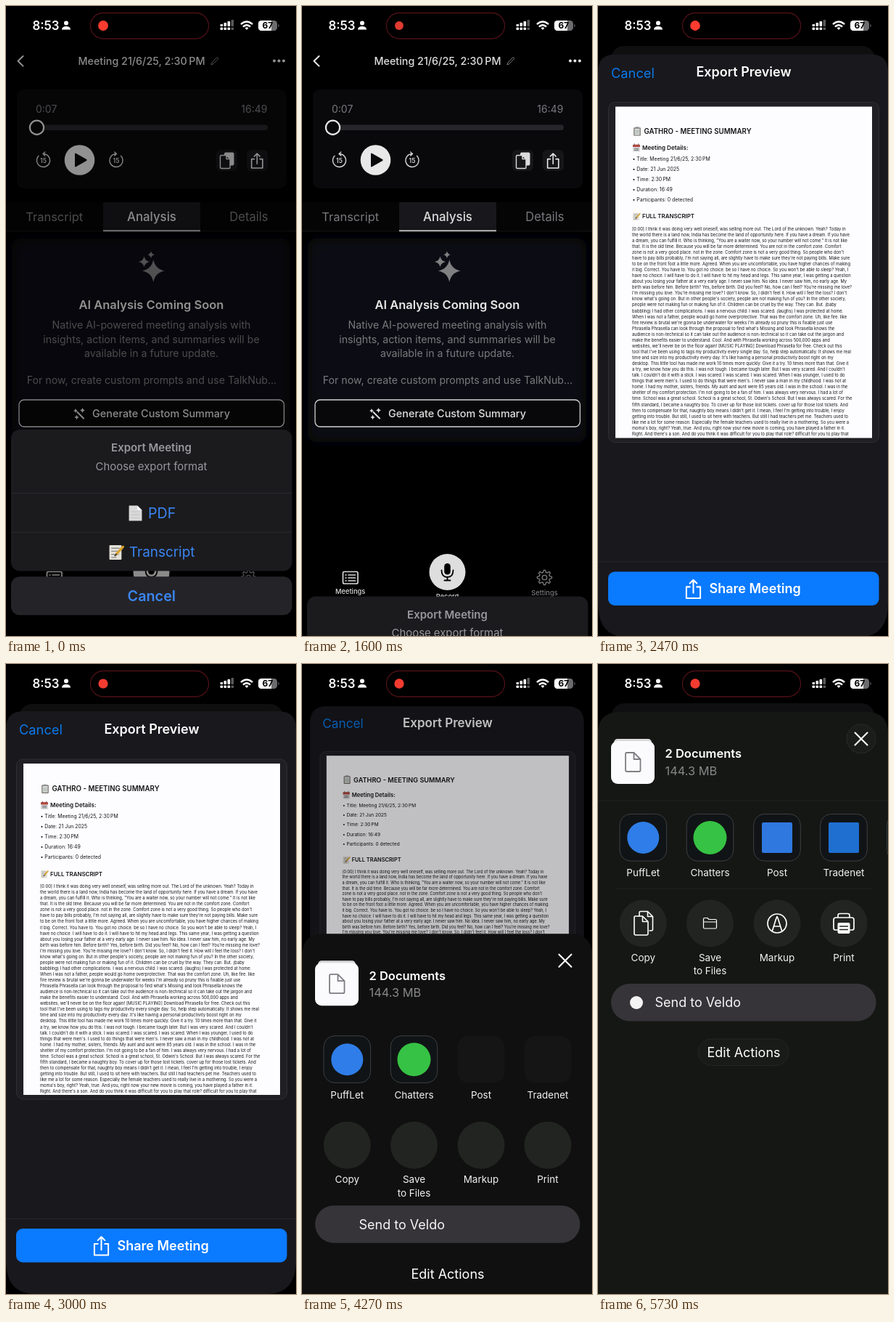
An HTML page that plays this animation: 400x867 px, repeating every 5.8 s.

```html
<!DOCTYPE html>
<html lang="en">
<head>
<meta charset="utf-8">
<title>Export meeting</title>
<style>
html, body { margin: 0; width: 100%; height: 100%; overflow: hidden; background: #000; }
svg { display: block; width: 100vw; height: 100vh; font-family: Inter, Roboto, sans-serif; }
</style>
</head>
<body>
<svg id="stage" viewBox="0 0 400 867"></svg>
<script>
const LOOP = 5800, SPRING = 18.26 / 1000;
const CLOSE_MENU = 1440, OPEN_PREVIEW = 2003, PREPARE = 3300, OPEN_SHARE = 4156.3;
const DIM = 0.43, SHARE_DIM = 0.39;

// y is the vertical middle of the text
function text(x, y, size, str, fill = '#fff', weight = 400, anchor = 'middle') {
  return `<text x="${x}" y="${y + size * 0.36}" font-size="${size}" fill="${fill}" font-weight="${weight}" text-anchor="${anchor}">${str}</text>`;
}
const left = (x, y, size, str, fill, weight) => text(x, y, size, str, fill, weight, 'start');
const box = (x, y, w, h, r, fill, more = '') =>
  `<rect x="${x}" y="${y}" width="${w}" height="${h}" rx="${r}" fill="${fill}" ${more}/>`;
const dot = (x, y, r, fill, more = '') => `<circle cx="${x}" cy="${y}" r="${r}" fill="${fill}" ${more}/>`;
const line = (d, color = '#fff', w = 1.5) =>
  `<path d="${d}" fill="none" stroke="${color}" stroke-width="${w}" stroke-linecap="round" stroke-linejoin="round"/>`;
const shape = (d, fill) => `<path d="${d}" fill="${fill}"/>`;
const at = (x, y, body, sx = 1, sy = sx) => `<g transform="translate(${x} ${y}) scale(${sx} ${sy})">${body}</g>`;

function star(x, y, r, fill) {
  const k = r * 0.16;
  return shape(`M${x} ${y - r}Q${x + k} ${y - k} ${x + r} ${y}Q${x + k} ${y + k} ${x} ${y + r}Q${x - k} ${y + k} ${x - r} ${y}Q${x - k} ${y - k} ${x} ${y - r}Z`, fill);
}

// Small pictograms, drawn around 0,0
const pageIcon = shape('M-8-10H3L9-4V10H-8Z', '#d9d9d9') + shape('M3-10V-4H9Z', '#f7f7f7') +
  line('M-5-2H5M-5 2H5M-5 6H5', '#c4c4c4', 1);
const memoIcon = box(-9, -9, 16, 19, 1, '#e4e1d8') + line('M-6-5H4M-6-1H4M-6 3H3M-6 7H0', '#8b8b8b', 1.2) +
  line('M9-7L0 3', '#dca32c', 3) + line('M0 3L-1.5 4.5', '#3c3c3c', 2);
const clipIcon = box(-8, -9, 16, 19, 1.5, '#77706a') + box(-6, -7, 12, 15, 0.5, '#d7dbd8') +
  box(-3.5, -10.5, 7, 4, 1, '#8b9095') + line('M-4-2H4M-4 1H4M-4 4H4', '#8f9a98', 1);
const calendarIcon = box(-9, -8, 18, 18, 1.5, '#d8dadc') + box(-9, -8, 18, 6, 1.5, '#b8453c') +
  line('M-5-10V-6M5-10V-6', '#666', 1.6) + line('M-5 2H5M-5 6H5', '#777', 2);
const shareIcon = line('M-4-3H-8V10H8V-3H4M0 4V-11M-4-7L0-11L4-7', '#fff', 1.7);

// side is 1 for back and -1 for forward
function skipIcon(x, side) {
  const arrow = line('M0-9A9 9 0 1 1-6.5-6.2M2.3-11.6L-.5-9L2.3-6.4', '#e8e8e8', 1.4);
  return at(x, 212.5, arrow, side, 1) + text(x, 213.1, 8.5, '15', '#e8e8e8', 600);
}

function gear(x, y) {
  let d = '';
  for (let i = 0; i <= 64; i++) {
    const a = i / 64 * 2 * Math.PI, r = 8.7 + 1.5 * Math.tanh(3 * Math.cos(8 * a));
    d += `${i ? 'L' : 'M'}${(x + r * Math.cos(a)).toFixed(1)} ${(y + r * Math.sin(a)).toFixed(1)}`;
  }
  return line(d, '#8b8b8e', 1.3) + dot(x, y, 3.2, 'none', 'stroke="#8b8b8e" stroke-width="1.3"');
}

function statusBar() {
  let bars = '';
  [3, 5, 7, 9].forEach((h, i) => {
    const x = 295.5 + i * 5, fill = i < 3 ? '#fff' : '#5a5a5c';
    bars += box(x, 28 - h, 3.6, h, 1, fill) + box(x, 29.5, 3.6, 3.6, 1, fill);
  });
  return left(36.5, 27, 16.8, '8:53', '#fff', 600) +
    dot(83, 23.6, 3, '#fff') + shape('M77 32.5C77 26.6 89 26.6 89 32.5Z', '#fff') +
    box(116.5, 9.5, 163, 35.5, 17.8, '#000', 'stroke="#4d1016" stroke-width="1.3"') +
    `<circle id="rec" cx="134" cy="27" r="6.5"/>` + bars +
    line('M324.7 24.5Q332 18.3 339.3 24.5M327.7 28Q332 24.3 336.3 28', '#fff', 2.4) +
    shape('M329.6 30.2Q332 28.3 334.4 30.2L332 33Z', '#fff') +
    box(348, 20, 26, 14, 4.3, '#6c6c6e') + shape('M352.3 20H366V34H352.3A4.3 4.3 0 0 1 348 29.7V24.3A4.3 4.3 0 0 1 352.3 20Z', '#fff') +
    shape('M375.5 24.5Q378 27 375.5 29.5Z', '#6c6c6e') + text(360.8, 27, 12, '67', '#000', 700);
}

function meetingPage() {
  const gray = '#858589';
  return `<rect id="mainBg" width="400" height="867" fill="#000"/>` +
    line('M23.5 69L16.5 75.8L23.5 82.6', '#fff', 2) +
    left(99.5, 75.5, 14.3, 'Meeting 21/6/25, 2:30\u2009PM', '#f4f4f4', 500) +
    line('M283 80.5L284 78L291 70.5L293 72.3L286 79.5Z', '#8b8b8e', 1) +
    [370, 376.5, 383].map(x => dot(x, 75.5, 2, '#fff')).join('') +
    box(15, 115, 372, 136, 9, '#0a0a0d') +
    left(41, 142, 14, '0:07', gray) + text(360.5, 142, 14, '16:49', gray, 400, 'end') +
    box(43, 163.5, 318, 7.5, 3.7, '#2a2a2e') +
    dot(42.5, 167.3, 9.6, '#0a0a0d', 'stroke="#fff" stroke-width="2.2"') +
    skipIcon(51.5, 1) + skipIcon(152, -1) +
    dot(101.5, 212, 20.8, '#fff') + shape('M95 203.5Q95 202 96.5 202.8L111 211Q112.5 212 111 213L96.5 221.2Q95 222 95 220.5Z', '#0a0a0d') +
    box(290, 198, 29, 29, 6, '#18181c') + box(332, 198, 29, 29, 6, '#18181c') +
    box(301, 201.5, 13.5, 18, 2, '#f2f2f2') + shape('M296 206H304L309 211V223H296Z', '#18181c') +
    line('M297 205.5H304L309 210.5V222.5Q309 223.5 308 223.5H297Q295.5 223.5 295.5 222V207Q295.5 205.5 297 205.5ZM304 205.5V210.5H309', '#f2f2f2', 1.4) +
    at(346.3, 213.5, shareIcon, 0.95) +
    box(0, 270, 400, 40, 0, '#050507') + box(134, 270, 134, 40, 0, '#1a1a1f') + box(0, 309.5, 400, 0.8, 0, '#232327') +
    box(134, 308.5, 134, 1.7, 0, '#fff') +
    text(66.7, 290, 16.5, 'Transcript', gray) + text(201, 290, 16.8, 'Analysis', '#f2f2f2', 500) + text(335, 290, 16.6, 'Details', gray) +
    box(8, 320, 384, 280, 12, '#0f0f12', 'filter="url(#soft)"') +
    star(203.3, 364.5, 15.5, '#8d8d90') + star(190.5, 352, 7.5, '#8d8d90') + star(200, 342.3, 5, '#8d8d90') +
    text(200.5, 411, 16.5, 'AI Analysis Coming Soon', '#fff', 600) +
    text(200.5, 439, 14.2, 'Native AI-powered meeting analysis with', gray) +
    text(200.5, 458.5, 14.2, 'insights, action items, and summaries will be', gray) +
    text(200.5, 478, 14.2, 'available in a future update.', gray) +
    text(201, 515, 14.2, 'For now, create custom prompts and use TalkNub…', gray) +
    box(18, 542, 365.5, 37, 7, '#09090b', 'stroke="#e6e6e6" stroke-width="1.3"') +
    line('M98.5 559L107 567.5', '#f2f2f2', 2) + star(105.5, 556.5, 3.4, '#f2f2f2') + star(96, 557, 3, '#f2f2f2') + star(97.5, 566, 3.2, '#f2f2f2') +
    text(214, 561, 14.4, 'Generate Custom Summary', '#f4f4f4', 500) +
    box(56.5, 778.5, 20.5, 16.5, 2, 'none', 'stroke="#eee" stroke-width="1.7"') +
    line('M60 783H61M64 783H73.5M60 787H61M64 787H73.5M60 791H61M64 791H73.5', '#eee', 1.7) +
    text(66.7, 805.5, 9.3, 'Meetings', '#f4f4f4', 500) +
    dot(200.5, 779, 25, '#f4f4f4') + box(196.2, 767, 8.6, 15.5, 4.3, '#000') +
    line('M192.5 776.5Q192.5 786 200.5 786Q208.5 786 208.5 776.5M200.5 786V790.5M196.5 790.5H204.5', '#000', 1.8) +
    text(200.5, 812.5, 9.3, 'Record', '#f4f4f4', 500) +
    gear(334.5, 786.5) + text(334.5, 807.5, 9.3, 'Settings', gray, 500);
}

function exportMenu() {
  const blue = '#3b86f2';
  return box(7, 583, 387.5, 194.5, 12, '#1b1b1e') + box(7, 670, 387.5, 0.8, 0, '#303034') + box(7, 723.8, 387.5, 0.8, 0, '#303034') +
    text(200.5, 608, 15, 'Export Meeting', '#98989d', 600) + text(200.5, 633.5, 14.9, 'Choose export format', '#98989d') +
    at(178, 698, pageIcon, 1.05) + left(196, 698, 19.6, 'PDF', blue) +
    at(152, 751.5, memoIcon, 1.05) + left(170, 751.5, 18.9, 'Transcript', blue) +
    box(7, 785.3, 387.5, 53, 12, '#242428') + text(200.8, 812, 19.8, 'Cancel', blue, 600);
}

const speech = `[0:00] I think it was doing very well oneself, was selling more out. The Lord of the unknown. Yeah? Today in
the world there is a land now, India has become the land of opportunity here. If you have a dream. If you have
a dream, you can fulfill it. Who is thinking, "You are a waiter now, so your number will not come." It is not like
that. It is the old time. Because you will be far more determined. You are not in the comfort zone. Comfort
zone is not a very good place. not in the zone. Comfort zone is not a very good thing. So people who don't
have to pay bills probably, I'm not saying all, are slightly have to make sure they're not paying bills. Make sure
to be on the front foot a little more. Agreed. When you are uncomfortable, you have higher chances of making
it big. Correct. You have to. You got no choice. be so I have no choice. So you won't be able to sleep? Yeah, I
have no choice. I will have to do it. I will have to hit my head and legs. This same year, I was getting a question
about you losing your father at a very early age. I never saw him. No idea. I never saw him, no early age. My
birth was before him. Before birth? Yes, before birth. Did you feel? No, how can I feel? You're missing me love?
I'm missing you love. You're missing me love? I don't know. So, I didn't feel it. How will I feel the loss? I don't
know what's going on. But in other people's society, people are not making fun of you? In the other society,
people were not making fun or making fun of it. Children can be cruel by the way. They can. But. (baby
babbling) I had other complications. I was a nervous child. I was scared. (laughs) I was protected at home.
When I was not a father, people would go home overprotective. That was the comfort zone. Uh, like fire. like
fire review is brutal we're gonna be underwater for weeks I'm already so pruny this is fixable just use
Phrasella Phrasella can look through the proposal to find what's Missing and look Phrasella knows the
audience is non-technical so it can take out the audience is non-technical so it can take out the jargon and
make the benefits easier to understand. Cool. And with Phrasella working across 500,000 apps and
websites, we'll never be on the floor again! [MUSIC PLAYING] Download Phrasella for free. Check out this
tool that I've been using to tags my productivity every single day. So, help step automatically. It shows me real
time and size into my productivity every day. It's like having a personal productivity boost right on my
desktop. This little tool has made me work 10 times more quickly. Give it a try. 10 times more than that. Give it
a try, we know how you do this. I was not tough. I became tough later. But I was very scared. And I couldn't
talk. I couldn't do it with a stick. I was scared. I was scared. I was scared. When I was younger, I used to do
things that were men's. I used to do things that were men's. I never saw a man in my childhood. I was not at
home. I had my mother, sisters, friends. My aunt and aunt were 85 years old. I was in the school. I was in the
shelter of my comfort protection. I'm not going to be a fan of him. I was always very nervous. I had a lot of
time. School was a great school. School is a great school, St. Odwin's School. But I was always scared. For the
fifth standard, I became a naughty boy. To cover up for those lost tickets. cover up for those lost tickets. And
then to compensate for that, naughty boy means I didn't get it. I mean, I feel I'm getting into trouble, I enjoy
getting into trouble. But still, I used to sit here with teachers. But still I had teachers pet me. Teachers used to
like me a lot for some reason. Especially the female teachers used to really live in a mothering. So you were a
moma's boy, right? Yeah, true. And you, right now your new movie is coming, you have played a father in it.
Right. And there's a son. And do you think it was difficult for you to play that role? difficult for you to play that`.split('\n');

function documentPage() {
  const ink = '#151515', lines = speech.concat(speech.slice(29));
  const facts = ['Title: Meeting 21/6/25, 2:30\u2009PM', 'Date: 21 Jun 2025', 'Time: 2:30\u2009PM', 'Duration: 16:49', 'Participants: 0 detected'];
  return at(54, 172, clipIcon, 0.6) + left(63.5, 172, 9.7, 'GATHRO - MEETING SUMMARY', ink, 600) +
    at(53, 194.5, calendarIcon, 0.55) + left(61, 194.5, 8.1, 'Meeting Details:', ink, 600) +
    facts.map((f, i) => left(47.5, 209.5 + i * 14, 6.9, '• ' + f, ink)).join('') +
    at(53, 289, memoIcon, 0.55) + left(61, 289, 7.9, 'FULL TRANSCRIPT', ink, 600) +
    lines.map((s, i) => left(47, 306 + i * 8.06, 5.82, s, ink)).join('');
}

function previewSheet() {
  let spokes = '';
  for (let i = 0; i < 8; i++)
    spokes += `<path class="spoke" d="M0-4.5V-9" stroke="#a5a4a9" stroke-width="2" stroke-linecap="round" transform="rotate(${i * 45})"/>`;
  return shape('M0 89Q0 65 24 65H376Q400 65 400 89V820Q400 867 360 867H40Q0 867 0 820Z', '#19181d') +
    left(18, 90.5, 18.3, 'Cancel', '#0a7aea') + text(201, 89.5, 18, 'Export Preview', '#fff', 600) +
    box(14.5, 131, 373, 468, 9, '#201f24', 'stroke="#302f34" stroke-width="1"') +
    box(24, 137, 354, 456, 0, '#fdfcff') +
    `<g clip-path="url(#paper)"><g id="doc">${documentPage()}</g></g>` +
    box(0, 763, 400, 0.8, 0, '#2b2a2f') +
    `<g id="ready">${box(14, 777, 373.5, 46.5, 9, '#0a7aff')}${at(131.5, 801.5, shareIcon, 1.2)}${left(153.5, 800.5, 18, 'Share Meeting', '#fff', 600)}</g>` +
    `<g id="busy">${box(14, 777, 373.5, 46.5, 9, '#3b3a40')}${at(145, 800.5, spokes)}${left(164, 800.5, 18.2, 'Preparing...', '#8b8a90', 600)}</g>`;
}

function shareSheet() {
  const cols = [62.3, 154.5, 247, 339], grey = '#222421';
  const sheet = fill => shape('M0 96Q0 66 30 66H370Q400 66 400 96V900H0Z', fill);
  const late = body => `<g class="late">${body}</g>`;
  const tile = x => box(x - 32.3, 206.5, 64.6, 64.6, 15, '#111416', 'stroke="#3c4042" stroke-width="1"');
  const label = (x, y, s) => text(x, y, 13.5, s, '#f2f2f2');
  const apps = ['PuffLet', 'Chatters', 'Post', 'Tradenet'];
  const marks = [dot(cols[0], 239, 22, '#2f7de8'), dot(cols[1], 239, 23, '#36c244'),
    box(cols[2] - 21, 218, 42, 42, 2, '#2f78e0'), box(cols[3] - 21, 218, 42, 42, 2, '#1f6fd0')];
  const actions =
    line('M57 347V342Q57 340.5 58.5 340.5H68.5L75.5 347.5V365Q75.5 367 73.5 367H71M68.5 340.5V347.5H75.5', '#fff', 1.6) +
    line('M51.5 347H61.5L69 354.5V371Q69 373 67 373H52Q50 373 50 371V348.5Q50 347 51.5 347ZM61.5 347V354.5H69', '#fff', 1.6) +
    line('M145.5 351Q145.5 349.5 147 349.5H151L153 351.5H162Q163.5 351.5 163.5 353V362.5Q163.5 364 162 364H147Q145.5 364 145.5 362.5ZM145.5 355H163.5', '#fff', 1.2) +
    dot(247, 357, 13, 'none', 'stroke="#fff" stroke-width="1.7"') +
    line('M240.5 367L245.5 351L247 347.5L248.5 351L253.5 367M243 361H251', '#fff', 1.7) +
    line('M331 349V346Q331 343.5 333.5 343.5H344.5Q347 343.5 347 346V349M330.5 366H327.5Q325 366 325 363.5V352Q325 349 328 349H350Q353 349 353 352V363.5Q353 366 350.5 366H347.5', '#fff', 1.7) +
    box(330.5, 356, 17, 15, 2, '#fff') + line('M333.5 361H344.5M333.5 365.5H344.5', grey, 1.3);
  return sheet('#0f100f') + late(sheet('#151714')) +
    box(22, 103, 52, 12, 5, '#d9d9dc') + box(18, 106, 60, 59, 9, '#fbfafd') +
    line('M39.5 122H49.5L58.5 131V146Q58.5 148 56.5 148H40Q38 148 38 146V123.5Q38 122 39.5 122ZM49.5 122V131H58.5', '#7e7e82', 1.8) +
    left(92.5, 123.5, 16.5, '2 Documents', '#fff', 600) + left(92.5, 147, 16.4, '144.3 MB', '#87888a') +
    late(dot(363, 103, 20, '#1b1d1a', 'stroke="#282b27" stroke-width="1"')) +
    line('M354.5 94.5L371.5 111.5M371.5 94.5L354.5 111.5', '#fff', 2.1) +
    late(box(0, 187.5, 400, 0.8, 0, '#232622') + box(25, 308.5, 352, 0.8, 0, '#232622')) +
    cols.map((x, i) => (i < 2 ? tile(x) + marks[i] : box(x - 32.3, 206.5, 64.6, 64.6, 15, '#141514')) + label(x, 287.5, apps[i])).join('') +
    late(tile(cols[2]) + tile(cols[3]) + tile(431) + marks[2] + marks[3]) +
    cols.map(x => dot(x, 357, 32.5, grey)).join('') + late(actions) +
    label(62.3, 404, 'Copy') + label(154.5, 404, 'Save') + label(154.5, 422.5, 'to Files') + label(247, 404, 'Markup') + label(339, 404, 'Print') +
    box(18, 440, 365.5, 51.5, 25.7, '#363438') +
    late(dot(53, 466, 9, '#f4f4f4') + box(138.5, 516, 124.5, 36.5, 18.2, '#191b18', 'stroke="#242723" stroke-width="1"')) +
    left(78.5, 466, 18, 'Send to Veldo', '#f6f6f6') +
    text(201, 534.5, 18, 'Edit Actions', '#fff');
}

const stage = document.getElementById('stage');
const shade = id => `<rect id="${id}" width="400" height="867" fill="#000"/>`;
stage.innerHTML = `<defs>
  <filter id="soft" x="-10%" y="-10%" width="120%" height="120%"><feGaussianBlur stdDeviation="9"/></filter>
  <clipPath id="round"><rect id="roundBox" width="400" height="867"/></clipPath>
  <clipPath id="paper"><rect x="24" y="137" width="354" height="456"/></clipPath>
</defs><rect width="400" height="867"/>
<g id="main"><g clip-path="url(#round)">${meetingPage()}</g></g>${shade('shadeMain')}
<g id="menu">${exportMenu()}</g>
<g id="preview">${previewSheet()}</g>${shade('shadePreview')}
<g id="share">${shareSheet()}</g>
<g>${statusBar()}</g>`;

const el = {};
stage.querySelectorAll('[id]').forEach(n => el[n.id] = n);
const lateParts = stage.querySelectorAll('.late'), spokes = stage.querySelectorAll('.spoke');
const set = (node, name, value) => node.setAttribute(name, value);
const show = (node, on) => set(node, 'display', on ? 'inline' : 'none');

// Critically damped spring, 0 to 1
function spring(t, start) {
  const u = Math.max(0, t - start) * SPRING;
  return 1 - (1 + u) * Math.exp(-u);
}

function draw(t) {
  const menu = spring(t, CLOSE_MENU), up = spring(t, OPEN_PREVIEW), share = spring(t, OPEN_SHARE);

  const s = 1 - 0.09 * up;
  set(el.main, 'transform', `translate(${200 * (1 - s)} ${55 * up}) scale(${s})`);
  set(el.main, 'opacity', Math.max(0, 1 - 2 * share));
  set(el.roundBox, 'rx', 20 * Math.min(1, up * 4));
  const g = Math.round(26 * up);
  set(el.mainBg, 'fill', `rgb(${g},${g},${g + 2 * up})`);
  set(el.shadeMain, 'opacity', DIM * (1 - menu + up * menu));

  set(el.menu, 'transform', `translate(0 ${290 * menu})`);
  show(el.menu, menu < 0.999);

  const drop = 802 * (1 - up), k = 1 - 0.09 * share;
  show(el.preview, up > 0);
  set(el.preview, 'transform', `translate(${200 * (1 - k)} ${65 - 11 * share - 65 * k + drop}) scale(${k})`);
  set(el.doc, 'transform', `translate(0 ${-Math.min(59, 0.59 * drop)})`);
  show(el.ready, t < PREPARE);
  show(el.busy, t >= PREPARE);
  const turn = Math.floor(Math.max(0, t - PREPARE) / 125);
  spokes.forEach((n, i) => set(n, 'opacity', 1 - 0.1 * ((turn - i + 800) % 8)));
  set(el.shadePreview, 'opacity', SHARE_DIM * share);

  show(el.share, share > 0);
  set(el.share, 'transform', `translate(0 ${801 * (1 - share)})`);
  const loaded = Math.min(1, Math.max(0, (t - 4280) / 130));
  lateParts.forEach(n => set(n, 'opacity', loaded));

  const pulse = 0.5 + 0.5 * Math.cos(t / 625 * 2 * Math.PI);
  set(el.rec, 'r', 5.9 + pulse);
  set(el.rec, 'fill', `rgb(${222 + 33 * pulse},59,48)`);
}

const begin = performance.now();
function tick() {
  draw((performance.now() - begin) % LOOP);
  requestAnimationFrame(tick);
}
tick();
</script>
</body>
</html>
```
